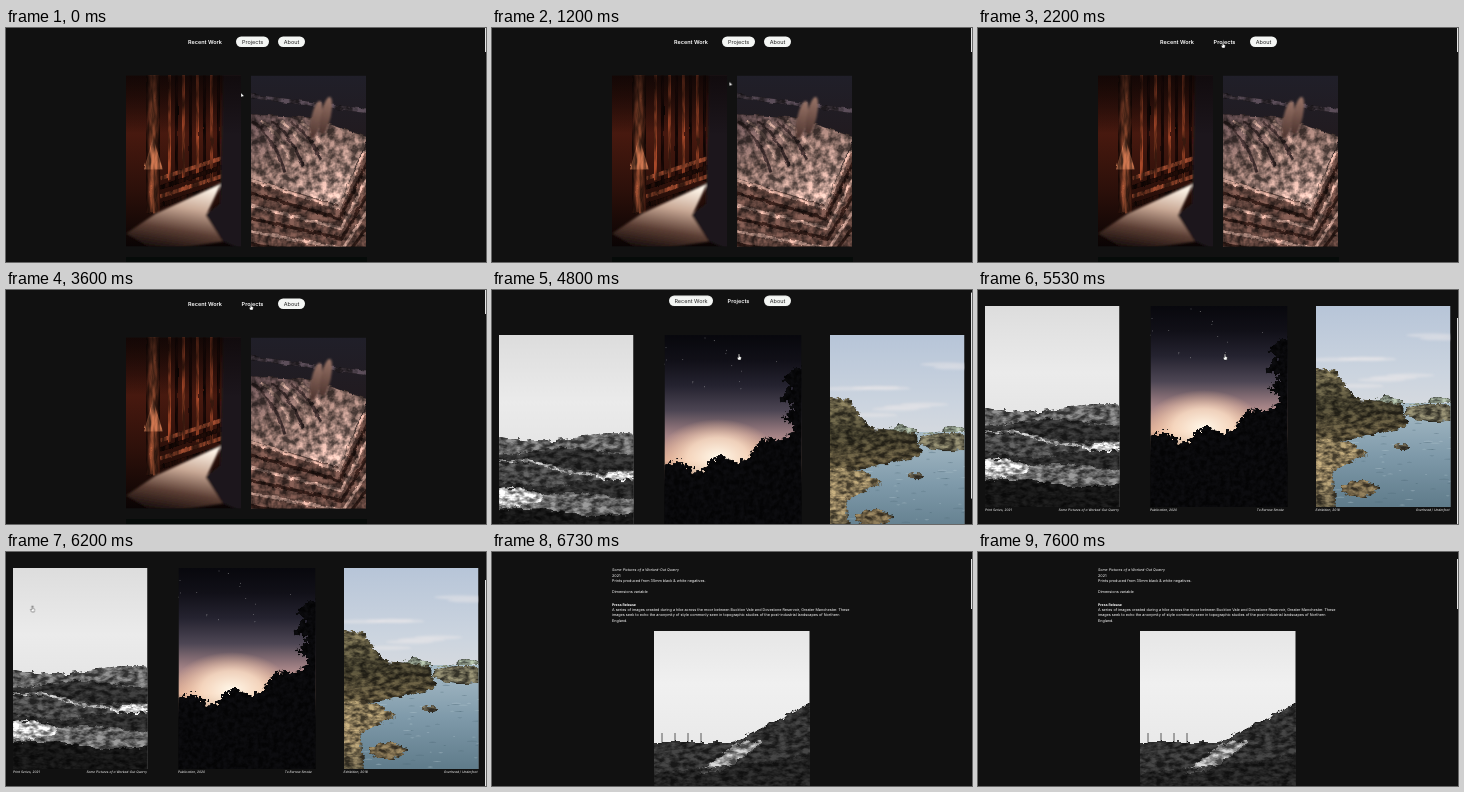
An HTML page for the animation above (8 s loop, 480x234 px).

```html
<!DOCTYPE html>
<html lang="en">
<head>
<meta charset="utf-8">
<title>Portfolio</title>
<style>
html, body { margin: 0; width: 100%; height: 100%; overflow: hidden; background: #111; }
svg { display: block; }
#stage { width: 100vw; height: 100vh; }
text { font-family: Inter, "Liberation Sans", sans-serif; fill: #fff; text-rendering: geometricPrecision; }
.nav { font-size: 5.5px; font-weight: 600; text-anchor: middle; }
.pill text { fill: #222; font-weight: 400; }
.cap { font-size: 3.25px; font-style: italic; }
.end { text-anchor: end; }
.body { font-size: 3.76px; }
.title { font-style: italic; font-size: 3.6px; }
.head { font-weight: 700; font-size: 3.5px; }
</style>
</head>
<body>
<svg id="stage" viewBox="0 0 480 234"></svg>
<script>
const LOOP = 8000;
const HOVER = 1530;
const OPEN_PROJECTS = 3800;
const OPEN_DETAIL = 6730;

let seed = 11;
const rnd = () => (seed = (seed * 16807) % 2147483647) / 2147483647;
const repeat = (n, draw) => Array.from({ length: n }, (_, i) => draw(i)).join('');

const poly = (points, fill) => `<polygon points="${points}" fill="${fill}"/>`;
const rect = (x, y, w, h, fill, extra = '') =>
  `<rect x="${x}" y="${y}" width="${w}" height="${h}" fill="${fill}" ${extra}/>`;
const oval = (x, y, rx, ry, fill, extra = '') =>
  `<ellipse cx="${x}" cy="${y}" rx="${rx}" ry="${ry}" fill="${fill}" ${extra}/>`;
const line = (d, color, width) => `<path d="${d}" fill="none" stroke="${color}" stroke-width="${width}"/>`;
const text = (x, y, cls, str) => `<text x="${x}" y="${y}" class="${cls}">${str}</text>`;
const group = (filter, art) => `<g filter="url(#${filter})">${art}</g>`;

// Everything below the curve y = f(x), with some overscan.
function below(w, h, f, fill) {
  const top = repeat(Math.ceil(w / 3) + 8, i => `${i * 3 - 12},${f(i * 3 - 12).toFixed(1)} `);
  return poly(`${top}${w + 12},${h + 12} -12,${h + 12}`, fill);
}

// Evenly spaced colour stops.
let defs = '';
let ids = 0;
function blend(colors, attrs = 'x2="0" y2="1"', kind = 'linear') {
  const id = 'g' + ids++;
  const stops = colors.map((c, i) => `<stop offset="${i / (colors.length - 1)}" stop-color="${c}"/>`).join('');
  defs += `<${kind}Gradient id="${id}" ${attrs}>${stops}</${kind}Gradient>`;
  return `url(#${id})`;
}
// Noise that frays the edges of shapes and mottles their colour.
function noise(id, freq, fray) {
  const gray = '2.4 0 0 0 -.7 ';
  defs += `<filter id="${id}" color-interpolation-filters="sRGB">
    <feTurbulence type="fractalNoise" baseFrequency="${freq}" numOctaves="3" seed="4" result="n"/>
    <feDisplacementMap in="SourceGraphic" in2="n" scale="${fray}" xChannelSelector="R" yChannelSelector="G" result="d"/>
    <feColorMatrix in="n" values="${gray.repeat(3)} 0 0 0 0 1"/>
    <feComposite in="d" operator="arithmetic" k1="1" k2=".5"/></filter>`;
}
noise('wood', '.25 .04', 2);
noise('stone', '.13', 4);
noise('rock', '.12 .22', 8);
noise('leaf', '.2', 12);
defs += '<filter id="soft"><feGaussianBlur stdDeviation="1.2"/></filter>';

const photo = (x, y, w, h, base, art) =>
  `<svg x="${x}" y="${y}" width="${w}" height="${h}">${rect(0, 0, w, h, blend(base))}${art}</svg>`;

function panelling() {
  const post = blend(['#220b07', '#7c4028', '#1c0905'], '');
  const floor = blend(['#fff6ea', '#c9a996', '#5a3d33', '#0c0606'], 'x1=".6" x2=".35" y2="1"');
  const boards = repeat(8, i => rect(42 + i * 7, -5, 3, 110, i % 2 ? '#170705' : '#70301b'));
  const rails = repeat(4, i => line(`M34 ${103 + i * 9}L98 ${82 + i * 9}`, i % 2 ? '#1c0a06' : '#6b321f', 4));
  return photo(120, 47.5, 115, 171, ['#220c08', '#48190f', '#2c100a', '#0a0404'],
    group('wood', boards + rails + rect(20, -5, 14, 143, post) + poly('18,94 27,62 37,94', '#8a4f35')) +
    group('soft', poly('30,138 95,108 80,140 97,166 30,176 0,158', floor) +
      poly('97,-5 120,-5 120,176 97,166 80,139 94,128', '#1d181b')) +
    rect(0, 0, 115, 60, blend(['#0a040499', '#0a040400'])));
}

function tomb() {
  const slab = blend(['#46363a', '#7a6059', '#b5948a'], 'x2=".6" y2="1"');
  const shoe = blend(['#9a7568', '#4c332e']);
  const folds = repeat(6, i => line(`M${i * 10} 46Q${20 + i * 9} 56 ${34 + i * 9} ${96 - i * 3}`, i % 2 ? '#94776e' : '#382929', 3));
  const ledges = repeat(6, i =>
    line(`M-5 ${103 + i * 13}L${88 + i} ${133 + i * 10}L120 ${62 + i * 17}`, i % 2 ? '#2a1814' : '#a88479', 3));
  return photo(245, 47.5, 115, 171, ['#201f29', '#211b20', '#3a2720', '#1a0e0a'],
    group('stone', line('M-5 20L120 36', '#3d343c', 4) + poly('-9,100 88,130 124,55 124,180 -9,180', '#5b4039') +
      poly('-9,38 60,42 117,62 88,130 -9,100', slab) + folds + ledges) +
    group('soft', repeat(2, i => oval(65 + i * 9, 44 - i * 4, 5, 19, shoe, `transform="rotate(12 ${65 + i * 9} 44)"`))));
}

function quarry() {
  const layers = ['#626262', '#2c2c2c', '#444', '#2a2a2a', '#686868', '#151515'];
  return photo(7, 16, 134.5, 201, ['#ddd', '#ebebeb', '#e2e2e2', '#ddd'],
    group('rock', layers.map((c, i) => below(135, 201, x => 102 + i * 15 + 4 * Math.sin(x / 25 + i * 2), c)).join('') +
      oval(14, 162, 30, 9, '#c4c4c4') + oval(122, 141, 23, 4, '#ccc') +
      line('M-5 125Q40 124 58 134T145 135', '#909090', 2)));
}

function dusk() {
  const glow = blend(['#fff8ea', '#ffe2c8cc', '#ffc7a000'], '', 'radial');
  const trees = x => 132 - 48 * (Math.max(0, x) / 137) ** 2.5 - 6 * Math.sin(x / 7);
  return photo(172.5, 16, 137, 201, ['#08080d', '#111018', '#252330', '#4d4654', '#a48386', '#d9aa94', '#000', '#000', '#000'],
    oval(53, 122, 60, 38, glow) +
    repeat(16, () => oval(rnd() * 130, rnd() * 65, 0.4, 0.4, '#bbb')) +
    group('leaf', below(137, 201, trees, '#08080a') +
      repeat(14, i => oval(126 + rnd() * 14, 36 + i * 4, 9, 5, '#08080a'))));
}

function coast() {
  const sea = blend(['#a9bdc8', '#7f9aaa', '#5f7b8a']);
  const cliff = blend(['#6a6248', '#3c3828', '#5c5139']);
  const shore = blend(['#7c6e50', '#8c7b5a', '#4b4534']);
  const waves = repeat(90, i => oval(rnd() * 135, 100 + rnd() * 100, 1 + rnd() * 4, 0.4, i % 2 ? '#b6c9d2' : '#4c6877', 'opacity=".5"'));
  return photo(338, 16, 134.5, 201, ['#b7c5d8', '#cbd4df', '#e0dfdf', '#d3dbe1'],
    group('soft', repeat(9, () => oval(rnd() * 135, 25 + rnd() * 60, 24, 2, '#f0ecea66'))) +
    rect(0, 97, 135, 104, sea) + waves +
    group('rock', below(145, 85, x => x < 60 ? 110 : 95 - 4 * Math.sin(x / 9), '#7d8778') +
      oval(118, 107, 30, 9, '#67634f') + poly('-12,61 18,64 40,93 84,97 92,120 40,132 -12,138', cliff) +
      poly('-12,132 32,135 52,148 16,164 20,206 -12,206', shore) +
      oval(44, 183, 18, 8, '#6b5d43') + oval(86, 141, 7, 3, '#5b5443')));
}

function hill() {
  const posts = repeat(4, i => line(`M${8 + i * 13} 112v-10`, '#333', 0.8));
  return photo(162, 79, 155.5, 160, ['#e6e6e6', '#f0f0f0', '#eaeaea', '#e6e6e6'],
    posts + group('rock', below(156, 160, x => 111 - 0.5 * Math.max(0, x - 80), '#2f2f2f') +
      poly('45,141 82,113 110,110 92,124 66,141', '#909090') +
      below(156, 160, x => 143 - x / 9, '#1b1b1bb0')));
}

const links = [['Recent Work', 177, 44], ['Projects', 230, 33], ['About', 272, 27]];
function nav(active, y) {
  return links.map(([label, x, w], i) => {
    const name = text(x + w / 2, y + 2, 'nav', label);
    return i === active ? name : `${i === 1 ? name : ''}
      <g class="pill" id="pill${active}${i}">${rect(x, y - 5.5, w, 10.5, '#f4f6f4', 'rx="5.2"')}${name}</g>`;
  }).join('');
}
const caption = (x, kind, name) => text(x, 221, 'cap', kind) + text(x + 134, 221, 'cap end', name);
const thumb = (id, y, h) => rect(479, y, 1, h, '#e4e4e4', `id="${id}"`);

const seriesName = 'Some Pictures of a Worked-Out Quarry';
const paragraph = (y, cls, lines) =>
  lines.map((str, i) => text(120, y + i * 5.3, i ? 'body' : 'body ' + cls, str)).join('');
const notes =
  paragraph(19.4, 'title', [seriesName, '2021', 'Prints produced from 35mm black &amp; white negatives.']) +
  paragraph(40.6, '', ['Dimensions variable']) +
  paragraph(53.7, 'head', ['Press Release',
    'A series of images created during a hike across the moor between Buckton Vale and Dovestone Reservoir, Greater Manchester. These',
    'images seek to echo the anonymity of style commonly seen in topographic studies of the post-industrial landscapes of Northern',
    'England.']);

const arrow = '<path id="arrow" d="M0 0V4L3 3Z" fill="#fff" stroke="#111" stroke-width=".3"/>';
const hand = `<path id="hand" d="M-.6 -3H.6V-.5L2.4 .3L1.8 3H-.8L-2 .5H-.6Z"
  fill="#fff" stroke="#111" stroke-width=".4" stroke-linejoin="round"/>`;

const pages = `
  <g id="work">${nav(0, 14)}${panelling()}${tomb()}${rect(120, 229, 241, 5, '#060b09')}${thumb('bar0', 0, 24)}</g>
  <g id="projects"><g id="scroll">${nav(1, -18)}${quarry()}${dusk()}${coast()}
    ${caption(7, 'Print Series, 2021', seriesName)}
    ${caption(172, 'Publication, 2020', 'To Borrow Smoke')}
    ${caption(337.5, 'Exhibition, 2018', 'Overhead / Underfoot')}</g>${thumb('bar1', 0, 206)}</g>
  <g id="detail">${notes}${hill()}${thumb('bar2', 7, 50)}</g>
  <g id="cursor">${arrow}${hand}</g>`;
document.getElementById('stage').innerHTML = `<defs>${defs}</defs>${rect(0, 0, 480, 234, '#111')}${pages}`;

// Each step is [ms, value, easing towards the next step].
function play(id, prop, steps, format = v => v) {
  const all = [...steps, [LOOP, steps[steps.length - 1][1]]];
  document.getElementById(id).animate(
    all.map(([ms, v, easing = 'step-end']) => ({ offset: ms / LOOP, [prop]: format(v), easing })),
    { duration: LOOP, iterations: Infinity });
}
const show = (id, ...steps) => play(id, 'opacity', steps);
const shift = ([x, y]) => `translate(${x}px, ${y}px)`;
const scrollTo = (id, from, to) =>
  play(id, 'transform', [[0, [0, from]], [4750, [0, from], 'ease-in-out'], [4990, [0, to]]], shift);

show('work', [0, 1], [OPEN_PROJECTS, 0]);
show('projects', [0, 0], [OPEN_PROJECTS, 1], [OPEN_DETAIL, 0]);
show('detail', [0, 0], [OPEN_DETAIL, 1]);
show('pill01', [0, 1], [HOVER, 0]);
show('arrow', [0, 1], [HOVER, 0], [4450, 1], [4540, 0]);
show('hand', [0, 0], [HOVER, 1], [4450, 0], [4540, 1]);
show('cursor', [0, 1], [OPEN_DETAIL, 0]);

scrollTo('scroll', 32, 0);
scrollTo('bar1', 0, 28);

const glide = 'ease-in-out';
play('cursor', 'transform', [[0, [235, 65]], [1000, [235, 65], glide], [1600, [245, 17]],
  [4380, [245, 17], glide], [4600, [247, 67]], [5650, [247, 67], glide], [6180, [26.5, 57]]], shift);
</script>
</body>
</html>
```
